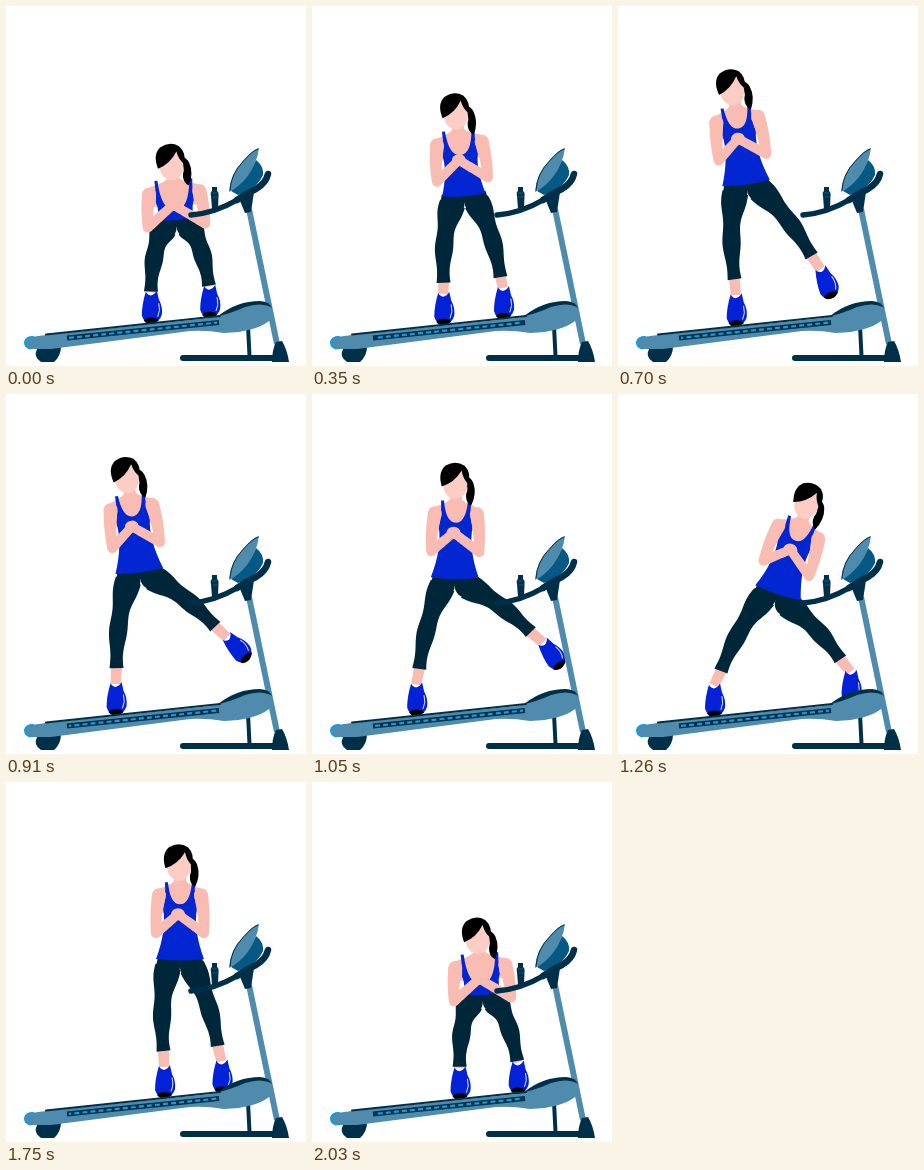
These frames come from a looping animation (300x360 px, 2.1 s). An HTML page with a canvas:

```html
<!DOCTYPE html>
<html lang="en">
<head>
<meta charset="utf-8">
<title>Treadmill side steps</title>
<style>
html, body { margin: 0; width: 100%; height: 100%; overflow: hidden; background: #fff; }
canvas { display: block; width: 300px; height: 360px; }
</style>
</head>
<body>
<canvas id="stage"></canvas>
<script>
const LOOP = 2100, STEP = 70, BELT_SPEED = 81 / LOOP;
const C = {
  skin: '#f8bcb3', face: '#fccdc4', hair: '#000', legs: '#00263a', top: '#0226d2', shoe: '#0322d8',
  dark: '#003049', steel: '#4e8bad', mid: '#075985', bright: '#169bdb'
};

const canvas = document.getElementById('stage');
const ctx = canvas.getContext('2d');
const ratio = window.devicePixelRatio || 1;
canvas.width = 300 * ratio;
canvas.height = 360 * ratio;

const mix = (a, b, u) => a + (b - a) * u;
const mixPoint = (a, b, u) => [mix(a[0], b[0], u), mix(a[1], b[1], u)];
const ease = u => u * u * (3 - 2 * u);

// Cyclic raised cosine: 1 at the peak, 0 outside the rise and fall times.
function bump(t, peak, rise, fall) {
  const d = (t - peak + 1.5 * LOOP) % LOOP - LOOP / 2;
  const w = d < 0 ? rise : fall;
  return Math.abs(d) < w ? .5 + .5 * Math.cos(Math.PI * d / w) : 0;
}

// Each foot rides the belt, then swings back through the air.
const LEFT = { lift: 1260, land: 1760, from: 96, to: 158, rise: 4, skew: 1 };
const RIGHT = { lift: 420, land: 1190, from: 188.5, to: 235, rise: 36, skew: 1.8 };

function footAt({ lift, land, from, to, rise, skew }, t) {
  const air = land - lift, since = (t - lift + LOOP) % LOOP, u = since / air;
  const flying = u < 1;
  const x = flying ? mix(from, to, ease(u)) : mix(to, from, (since - air) / (LOOP - air));
  const height = flying ? rise * Math.sin(Math.PI * u ** skew) : 0;
  return { x, y: 301 - x * .1 - height, angle: -height * .021 };
}

function poseAt(t) {
  const squat = bump(t, 2070, 330, 620);
  const lunge = bump(t, 1270, 350, 465);
  const sway = bump(t, 720, 700, 860);
  return {
    squat,
    hip: [174 - 46 * sway - 4 * squat, 177 + 36 * squat + 22 * lunge],
    lean: (21 * lunge - 8 * sway - 4 * squat) * Math.PI / 180,
    length: 75 - 38 * squat
  };
}

function shape(path, fill) {
  ctx.fillStyle = fill;
  ctx.fill(new Path2D(path));
}

function line(path, color, width, cap = 'round') {
  ctx.strokeStyle = color;
  ctx.lineWidth = width;
  ctx.lineCap = cap;
  ctx.stroke(new Path2D(path));
}

function oval(x, y, rx, ry, fill) {
  ctx.fillStyle = fill;
  ctx.beginPath();
  ctx.ellipse(x, y, rx, ry, 0, 0, 7);
  ctx.fill();
}

// A curved limb through three points; radius(u) gives its half width.
function limb(a, b, c, radius, fill) {
  const bend = [0, 1].map(i => 2 * b[i] - (a[i] + c[i]) / 2);
  const near = [], far = [];
  for (let i = 0; i <= 24; i++) {
    const u = i / 24, r = radius(u);
    const p = mixPoint(a, bend, u), q = mixPoint(bend, c, u), [x, y] = mixPoint(p, q, u);
    const angle = Math.atan2(q[1] - p[1], q[0] - p[0]);
    near.push([x - r * Math.sin(angle), y + r * Math.cos(angle)]);
    far.unshift([x + r * Math.sin(angle), y - r * Math.cos(angle)]);
  }
  shape('M' + near.concat(far).join('L') + 'Z', fill);
}

function placed(x, y, angle, draw) {
  ctx.save();
  ctx.translate(x, y);
  ctx.rotate(angle);
  draw();
  ctx.restore();
}

function drawShoe() {
  shape('M-5 -1Q-4 2 0 3Q4 2 6 -2L8 7Q12 14 11 22Q9 29 2 31Q-7 31 -9 23Q-9 12 -5 -1Z', C.shoe);
  line('M8 11Q10 18 7 24', '#dfe6ff', 1);
  shape('M-7 28Q-5 25 0 25Q6 25 8 28Q4 31.500 0 31.500Q-5 31.500 -7 28Z', C.hair);
}

const legRadius = u => 13 - 11 * u + 5 * u * u + Math.sin(4 * Math.PI * u);

function drawLeg(side, joint, { x, y, angle }, squat) {
  const foot = [x, y], reach = Math.hypot(x - joint[0], y - joint[1]);
  const knee = mixPoint(joint, foot, .4);
  knee[0] += side * 4 * (y - joint[1]) / reach;
  knee[1] -= side * 4 * (x - joint[0]) / reach;
  const shin = Math.hypot(x - knee[0], y - knee[1]);
  const cuff = mixPoint(knee, foot, 1 - (15 * (1 - squat) + 1) / shin);
  limb(knee, mixPoint(knee, foot, .5), foot, u => 7 - 2 * u, C.skin);
  placed(x, y, angle, drawShoe);
  oval(joint[0], joint[1], 12, 12, C.legs);
  limb(joint, knee, cuff, legRadius, C.legs);
}

function drawHead() {
  shape('M9 -8Q15 -9 18 -2Q22 9 16 21Q10 17 11 9Q14 3 9 -4Z', C.hair);
  oval(0, 0, 12, 14.5, C.face);
  shape('M-13.500 2Q-18 -12 -10 -19Q0 -25 9 -19Q16 -12 13 -1Q8 -5 6 -14Q-1 -2 -13.500 2Z', C.hair);
}

function drawUpperBody(length, squat) {
  const wide = 1 + .2 * squat, strap = 13 + 4 * squat, dip = 20 + 9 * squat;
  const waist = length * .6, low = 24 - 4 * squat;
  const side = 17 + 2 * squat, hem = 24 - 7 * squat, slim = 13 + 4 * squat;
  shape(`M-6 -12L6 -12L6 -3Q10 1 ${20 * wide} 4L${18 * wide} ${low + 4}L${-18 * wide} ${low + 4}L${-20 * wide} 4Q-10 1 -6 -3Z`, C.skin);
  shape(`M${-strap - 2} -2L${1 - strap} -2Q${3 - strap} ${dip} 0 ${dip}Q${strap - 3} ${dip} ${strap - 1} -2L${strap + 2} -2
    Q${strap + 1} 14 ${side} ${low}Q${slim} ${waist} ${hem} ${length}Q0 ${length + 3} ${-hem} ${length}
    Q${-slim} ${waist} ${-side} ${low}Q${-strap - 1} 14 ${-strap - 2} -2Z`, C.top);
  const hand = [-2, 30 - 7 * squat];
  for (const s of [-1, 1]) {
    const shoulder = [s * 21 * wide, 11], elbow = [s * 24 * wide, 49 - 5 * squat];
    const middle = mixPoint(shoulder, elbow, .5);
    oval(shoulder[0], shoulder[1], 7, 7, C.skin);
    oval(elbow[0], elbow[1], 5, 5, C.skin);
    limb(shoulder, [middle[0] + s, middle[1]], elbow, u => 7 - 2 * u, C.skin);
    limb(elbow, mixPoint(elbow, hand, .5), hand, u => 5 - u / 2, C.skin);
  }
  oval(hand[0], hand[1], 7, 6, C.skin);
  placed(-1, -18 + 2 * squat, 0, drawHead);
}

function drawWoman(t) {
  const { squat, hip, lean, length } = poseAt(t);
  const cos = Math.cos(lean), sin = Math.sin(lean);
  for (const [side, foot] of [[1, RIGHT], [-1, LEFT]]) {
    const joint = [hip[0] + side * 12 * cos - 8 * sin, hip[1] + side * 12 * sin + 8 * cos];
    drawLeg(side, joint, footAt(foot, t), squat);
  }
  placed(hip[0], hip[1], lean, () => {
    shape('M-22 -2L22 -2L24 8L-24 8Z', C.legs);
    ctx.translate(0, -length);
    drawUpperBody(length, squat);
  });
}

function drawTreadmill(t) {
  // Frame and base
  line('M242 320L243.500 350', C.dark, 4);
  line('M177 352L268 352', C.dark, 6);
  line('M243 203L271 338', C.steel, 6, 'butt');
  shape('M270 336L276 335Q281 343 283 356L266 356Q266 344 270 336Z', C.dark);
  shape('M31 343L55 340Q55 350 48 356L35 356Q27 351 31 343Z', C.dark);

  // Deck and moving belt
  shape('M212 310Q231 295 254 295Q264 296 266 302L255 307L218 312Z', C.dark);
  shape('M25 331L40 329L205 312Q224 308 239 301Q255 296 265 301Q269 308 263 315Q249 326 218 327Q200 324 184 325L45 343L24 343Q17 340 19 335Q21 331 25 331Z', C.steel);
  line('M27 331Q20 331 19 336Q19 341 24 342.500', C.bright, 2);
  line('M40 328.500L214 310', C.dark, 2);
  line('M61 332L213 316.500', C.dark, 5, 'butt');
  ctx.setLineDash([5, 3.1]);
  ctx.lineDashOffset = BELT_SPEED * t;
  line('M63 331.900L211 316.600', C.bright, 2.2, 'butt');
  ctx.setLineDash([]);

  // Bottle, console and handle
  shape('M205 190Q204 186 206 185L206 181L211 181L211 185Q213 186 212.500 190L212 203L206 203Z', C.dark);
  line('M206 187L211 187M207 191L211 191', C.mid, 1);
  shape('M250 154Q258 160 257 169Q250 184 232 189L225 185Q242 172 250 154Z', C.mid);
  shape('M223 186Q224 168 237 155Q246 144 253 142Q251 158 241 171Q232 182 223 186Z', C.steel);
  line('M224 184Q225 168 237 155.500Q246 145 252 143', C.dark, 1);
  line('M185 209Q209 207 231 194', C.dark, 5.5);
  line('M231 194Q241 187 250 183Q260 177 262 168', C.dark, 6.5);
  shape('M232 190L248 186L245 206L239 207Z', C.dark);
}

function render(now) {
  const t = Math.floor(now % LOOP / STEP) * STEP;
  ctx.setTransform(ratio, 0, 0, ratio, 0, 0);
  ctx.fillStyle = '#fff';
  ctx.fillRect(0, 0, 300, 360);
  drawWoman(t);
  drawTreadmill(t);
}

const start = performance.now();
function tick() {
  render(performance.now() - start);
  requestAnimationFrame(tick);
}
tick();
</script>
</body>
</html>
```
